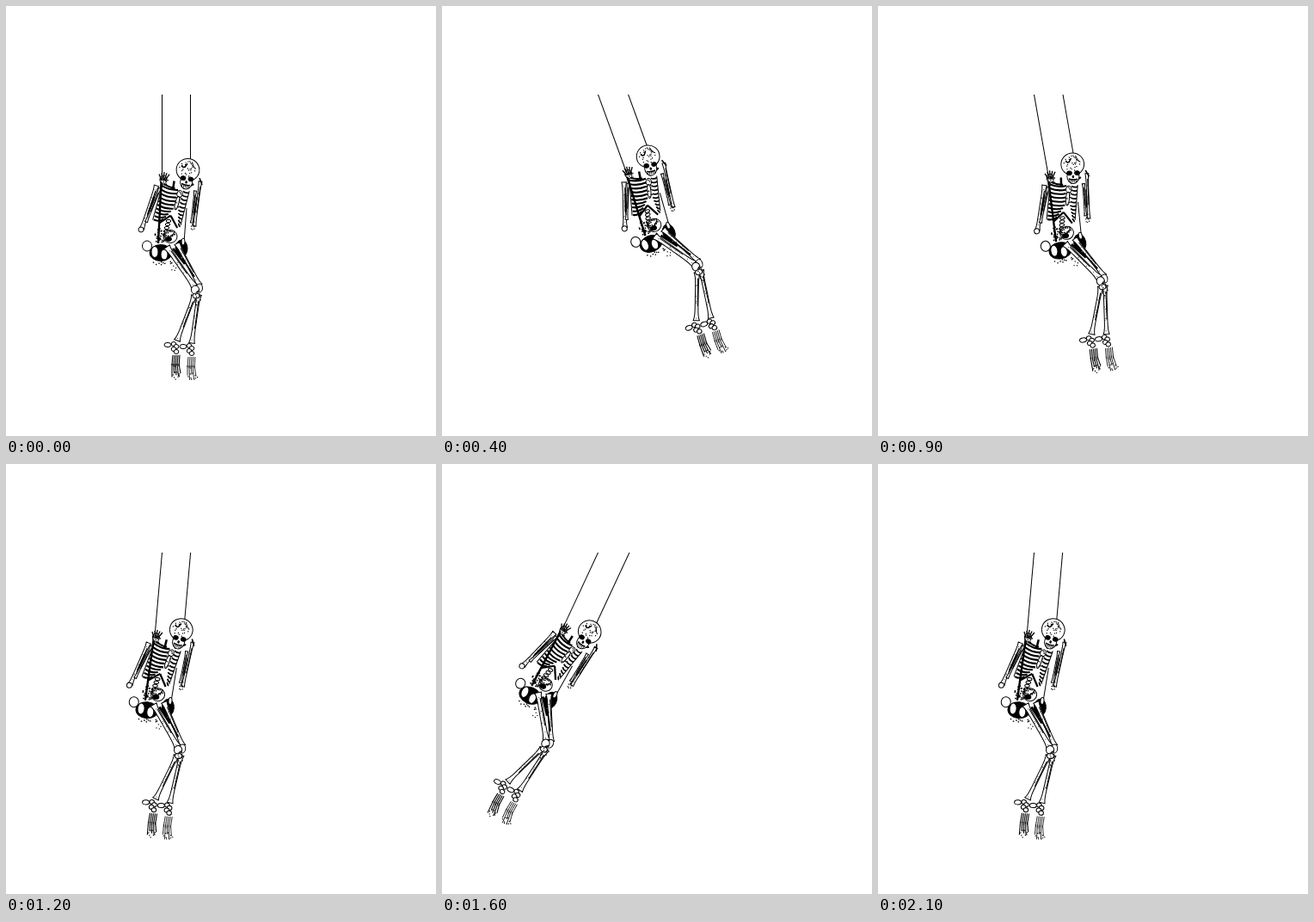
An HTML page with a canvas that plays this animation: 500 by 500 pixels, repeating every 2200 ms.

```html
<!DOCTYPE html>
<html lang="en">
<head>
<meta charset="utf-8">
<title>Skeleton on a swing</title>
<style>
html, body { margin: 0; width: 100%; height: 100%; overflow: hidden; background: #fff; }
canvas { display: block; }
</style>
</head>
<body>
<canvas id="stage" width="500" height="500"></canvas>
<script>
const ctx = document.getElementById('stage').getContext('2d');
const INK = '#000', PAPER = '#fff';
const LEFT = 181.5, GAP = 33, TOP = 103;
const STEP = 100, STEPS = 22;

const rand = n => { const v = Math.sin(n * 12.9898) * 43758.5453; return v - Math.floor(v); };

function line(width, x1, y1, x2, y2, sag = 0) {
  ctx.beginPath();
  ctx.moveTo(x1, y1);
  ctx.quadraticCurveTo((x1 + x2) / 2, (y1 + y2) / 2 + sag, x2, y2);
  ctx.lineWidth = width;
  ctx.stroke();
}

function paint(fill) {
  ctx.fillStyle = fill;
  ctx.fill();
  ctx.lineWidth = 1;
  ctx.stroke();
}

function oval(x, y, rx, ry = rx, fill = PAPER) {
  ctx.beginPath();
  ctx.ellipse(x, y, rx, ry, 0, 0, 7);
  paint(fill);
}

// Ink dots scattered over an ellipse
function specks(count, x, y, rx, ry, size = 1.2) {
  ctx.fillStyle = INK;
  for (let i = 0; i < count; i++) {
    const a = i * 2.4, r = Math.sqrt(rand(i + x));
    ctx.fillRect(x + rx * r * Math.cos(a), y + ry * r * Math.sin(a), size, size);
  }
}

function inFrame(x, y, turn, drawPart) {
  ctx.save();
  ctx.translate(x, y);
  ctx.rotate(turn);
  drawPart();
  ctx.restore();
}

// Slim shaft that flares towards both ends, shaded along one side
function bone(x1, y1, x2, y2, slim, flare) {
  const len = Math.hypot(x2 - x1, y2 - y1);
  inFrame(x1, y1, Math.atan2(y2 - y1, x2 - x1), () => {
    ctx.beginPath();
    for (const side of [1, -1])
      for (let i = -10; i <= 10; i++) {
        const f = side * i / 10;
        ctx.lineTo(len * (1 + f) / 2, side * (slim + (flare - slim) * f ** 6));
      }
    ctx.closePath();
    paint(PAPER);
    line(1, len * .12, -slim * .5, len * .7, -slim * .6);
    specks(len / 8, len * .5, 0, len * .45, slim * .6, .8);
  });
}

function arms() {
  bone(175, 209, 158, 259, 1.7, 2.8);
  bone(179, 212, 163, 251, .9, 1.6);
  line(2, 172, 222, 165, 242);
  oval(157, 260, 3);
  bone(226, 204, 219, 256, 1.2, 2);
  bone(220, 215, 216, 252, .9, 1.6);
  line(1.6, 222, 222, 219, 243);
  specks(8, 217, 256, 3, 4);
}

// Rib cage upright in its own tilted frame
function torso() {
  inFrame(197, 210, .25, () => {
    line(2.5, -3, -6, -2, 4);
    line(2, -14, 0, 0, 2, 2);
    line(2, 9, 0, 20, -8);
    for (let i = 0; i < 10; i++) {
      const y = 3 + i * 4.5, arch = Math.max(0, i - 5);
      line(2.1, -15, y, 4 - arch * 2, y - arch * .8, 3);
      line(1.7, 10 + arch, y - arch * .8, 17, y, 2);
    }
    line(1, -15, 1, -16, 44);
    line(1, 17, 1, 17, 42);
    for (const side of [-1, 1]) line(2.2, 3, 34, 3 + side * 11, 46);
    oval(7, 7, 3.2, 4);
    oval(6.5, 18, 2, 8);
    specks(14, 7, 13, 3, 11);
  });
  for (let i = 0; i < 5; i++) oval(189 - i, 250 + i * 4, 2.8, 1.6);
}

function pelvis() {
  oval(180, 287, 13, 9.5, INK);
  oval(204, 282, 7, 10, INK);
  oval(164, 279, 5.5, 6);
  oval(173, 286, 4, 6.5);
  oval(184, 289, 4, 6);
  oval(191, 268, 8, 7.5);
  oval(189, 271, 3.5, 2.5, INK);
  specks(22, 190, 265, 7, 5, 1.5);
  specks(30, 179, 267, 7, 9, 1.6);
  oval(206, 274, 2, 4);
  specks(10, 182, 298, 12, 3, 1.4);
  specks(4, 194, 304, 3, 4);
}

// Heel to the left, ankle bones, then streaky toes
function foot(x, y, ink) {
  oval(x - 9, y - 6, 4, 2.6);
  for (let i = 0; i < 4; i++) oval(x - 2 + 3 * (i % 2), y - 7 + i * 3, 2.8, 2.5);
  for (let i = 0; i < 5; i++) {
    const tx = x - 4 + i * 2, end = y + 26 + rand(i + x) * 7;
    line(ink, tx + 1, y + 6, tx, y + 18 + i % 3, i - 2);
    line(ink, tx, y + 16, tx + i / 2, end);
  }
  specks(9, x + 1, y + 29, 6, 5);
}

function legs() {
  bone(199, 276, 225, 325, 2, 3.4);
  bone(187, 280, 219, 326, 2.4, 4);
  line(2.8, 194, 282, 208, 300);
  line(1.8, 205, 293, 219, 315);
  bone(224, 336, 216, 392, 1.8, 3.4);
  bone(219, 337, 199, 389, 1.8, 3.6);
  oval(225, 328, 3.5, 5);
  oval(220, 330, 4.6, 5);
  oval(221, 337, 4, 3);
  specks(16, 222, 338, 4, 10, 1.3);
  foot(215, 402, .8);
  foot(197, 400, 1.1);
}

function skull() {
  inFrame(211.5, 190.5, .2, () => {
    oval(1, 14, 7, 8.5);
    oval(0, 0, 13.4, 13);
    ctx.fillStyle = PAPER;
    ctx.fillRect(-5, 8, 12, 8);
    oval(-3.5, 10.5, 2.8, 2.3, INK);
    oval(5.5, 10, 2.8, 2.3, INK);
    oval(1, 14.5, .8, 1.2, INK);
    line(1.4, -4, 17, 6, 17, 2);
    for (let i = 0; i < 5; i++) line(.8, -3 + i * 2, 17, -3 + i * 2, 21);
    line(1.5, -8, -4, -2, -7, 7);
    line(1, 3, -10, 9, -3, 3);
    specks(26, -1, -2, 10, 9);
  });
  line(1.6, 225, 200, 228, 208);
}

function hand() {
  oval(183, 202, 4, 5);
  for (let i = 0; i < 5; i++)
    line(1.3, 181 + i, 203, 178 + i * 3, 193 + Math.abs(i - 2) * 1.3);
  specks(16, 183, 202, 5, 6, 1.3);
}

function skeleton() {
  ctx.strokeStyle = INK;
  line(1, LEFT + GAP, 60, LEFT + GAP, 185);
  line(1, 210, 235, 207, 275);
  arms();
  torso();
  pelvis();
  legs();
  skull();
  hand();
  line(1, LEFT, 60, LEFT, 198);
  line(2.4, LEFT - 1, 205, 177, 276);
}

// Out to one side in five steps, a pause, over to the other side, a pause, and back
function swing(step) {
  if (step < 7) return Math.min(step, 5);
  return step < 18 ? Math.max(11 - step, -5) : step - STEPS;
}

function draw(now) {
  const step = Math.floor(now / STEP) % STEPS;
  ctx.fillStyle = PAPER;
  ctx.fillRect(0, 0, 500, 500);
  ctx.save();
  ctx.beginPath();
  ctx.rect(0, TOP, 500, 500);
  ctx.clip();
  inFrame(LEFT, TOP, -swing(step) * Math.PI / 36, () => {
    ctx.translate(-LEFT, -TOP);
    skeleton();
  });
  ctx.restore();
}

const start = performance.now();
function loop() {
  draw(performance.now() - start);
  requestAnimationFrame(loop);
}
loop();
</script>
</body>
</html>
```
